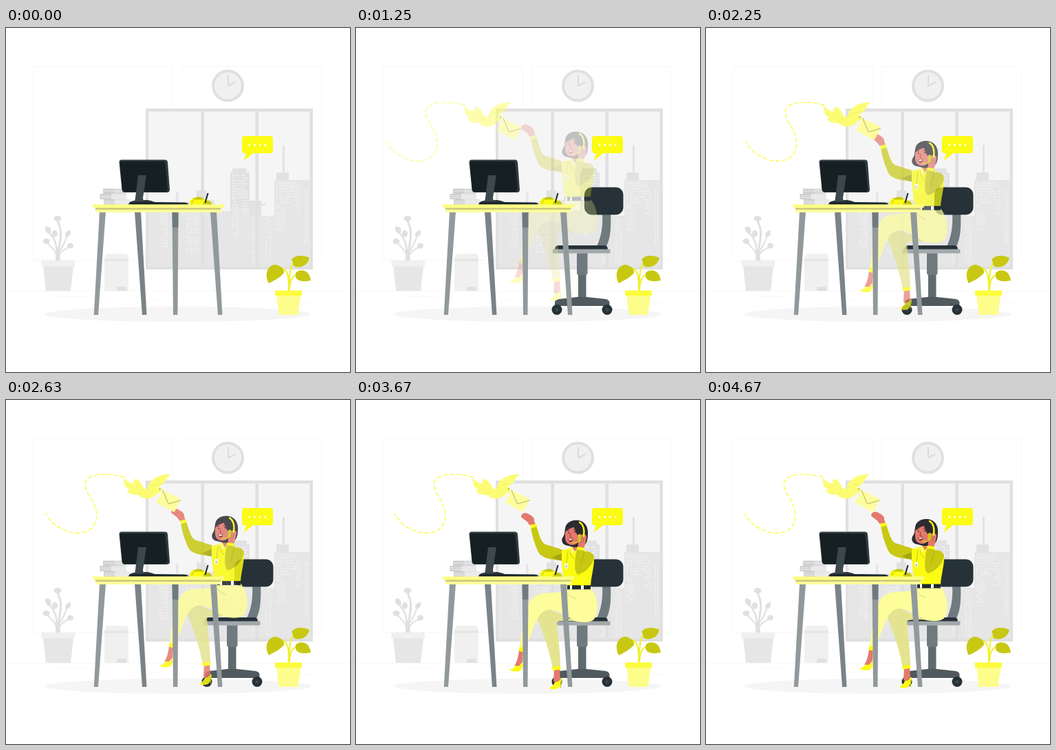
Recreate the animation shown at these times as an HTML page. Size 500 by 500 pixels, loop 4710 ms.

```html
<!DOCTYPE html>
<html lang="en">
<head>
<meta charset="utf-8">
<title>Office call</title>
<style>
html, body { margin: 0; width: 100%; height: 100%; overflow: hidden; background: #fff; }
svg { display: block; width: 100vw; height: 100vh; }
.y { fill: #fbfb13; }
.pale { fill: #fdfd9b; }
.olive { fill: #c8c813; }
.dark { fill: #263238; }
.skin { fill: #e4796c; }
.line { fill: none; stroke-linecap: round; stroke-linejoin: round; }
</style>
</head>
<body>
<svg viewBox="0 0 500 500" xmlns="http://www.w3.org/2000/svg">
  <g id="room">
    <g fill="#fff" stroke="#f7f7f7">
      <rect x="39" y="55.5" width="203.500" height="282" rx="2"/>
      <rect x="255" y="55.500" width="203.500" height="282" rx="2"/>
    </g>
    <path d="M0 382.500H500M405 398.500H449M75 390.500H118M193 395.500H225" stroke="#f3f3f3" stroke-width=".6"/>

    <rect x="203" y="117" width="243" height="234" fill="#e0e0e0"/>
    <rect x="207" y="121.500" width="234.500" height="225.500" fill="#f5f5f5"/>
    <path fill="#e6e6e6" d="M207 347V262H222V258H247V238H250.500V258H262V252H277V236H283.500V218H285V236H291V250H303V266H326V210H329V204H350V210H354V251H371V255H378V258H371V273H390V221H393V210H402V170H405V210H411V221H441.500V347Z"/>
    <path fill="#e0e0e0" d="M326 210H329V204H350V210H354V262H326ZM393 210H402.500V170H404.500V210H411V221H393ZM277 236H291V246H277ZM354 251H371V273H354Z" opacity=".65"/>
    <g id="lights" fill="#efefef"></g>
    <path fill="#e0e0e0" d="M283.500 120H288V349H283.500ZM362.500 120H367V349H362.500Z"/>

    <circle cx="322.500" cy="84" r="21.500" fill="#f0f0f0" stroke="#e0e0e0" stroke-width="4"/>
    <path class="line" d="M323 69V84L333 79" stroke="#dcdcdc" stroke-width="2"/>

    <ellipse cx="249.500" cy="416" rx="194" ry="11" fill="#f5f5f5"/>

    <g class="line" stroke="#e0e0e0" stroke-width="3">
      <path d="M75 338C76 316 82 304 79 292 78 286 75 284 75 277" />
      <path d="M75 338C74 315 72 308 64 299" stroke-width="2.500"/>
      <path d="M74 332C71 320 64 318 59 311M77 331C80 322 88 322 93 317M77 325C84 316 87 309 89 300" stroke-width="2"/>
    </g>
    <g fill="#e0e0e0">
      <ellipse cx="75" cy="277" rx="5.500" ry="4"/>
      <ellipse cx="71" cy="299" rx="4" ry="5"/>
      <ellipse cx="58.500" cy="310" rx="5" ry="4"/>
      <ellipse cx="93.500" cy="316.500" rx="4.500" ry="4"/>
      <path d="M57 289C64 287 68 293 64 300 58 298 56 293 57 289ZM94 294C95 300 92 304 87 304 84 298 89 294 94 294Z"/>
      <path d="M72 322H78L79 338H72Z"/>
    </g>
    <path fill="#e6e6e6" d="M54 346H98L94 382H58Z"/>
    <rect x="51.500" y="338" width="48.500" height="8.500" rx="1" fill="#f0f0f0"/>

    <path fill="#f0f0f0" d="M143 338H178V382H143ZM144 335C144 330 146 328 149 328H173C176 328 178 330 178 335Z"/>
    <rect x="143" y="335" width="35" height="4" fill="#e6e6e6"/>
    <path fill="#e0e0e0" d="M161 382V378Q161 376 163 376H172Q175 376 175 379V382Z"/>
  </g>

  <g id="chair">
    <path fill="#6f7a7e" d="M358 268H370C371 289 370 306 364 317H350C357 303 359 287 358 268Z"/>
    <rect class="dark" x="332" y="231.500" width="56.500" height="40" rx="11"/>
    <path class="line" d="M340 236Q335 238 335 246V258Q336 267 342 268" stroke="#37474f"/>
    <path class="dark" d="M289 322Q289 316 294 316H361Q366 316 366 322Z"/>
    <rect x="286" y="321.500" width="83.500" height="6" rx="1" fill="#a2a9ac"/>
    <path fill="#5f6a6e" d="M323 355H334.500V396H323Z"/>
    <path fill="#6f7a7e" d="M321 327.500H336.500V357Q336 359 333 359H324Q321 359 321 356Z"/>
    <path fill="#50595d" d="M289 404V398Q290 395 295 394L322 391H335L363 394Q368 395 368.500 399V404Z"/>
    <circle class="dark" cx="292" cy="409.500" r="7.500"/>
    <circle class="dark" cx="365" cy="409.500" r="7.500"/>
    <circle cx="292" cy="409.500" r="2.500" fill="#37474f"/>
    <circle cx="365" cy="409.500" r="2.500" fill="#37474f"/>
  </g>

  <g id="woman">
    <!-- far leg -->
    <path class="skin" d="M288 389H296L297 404 292 410 287 407Z"/>
    <path class="y" d="M298 402C300 407 298 413 294 417 290 419 284 419 281 417 285 414 288 412 289 408 293 409 296 406 298 402Z"/>
    <path d="M297.500 407V417" stroke="#c8c813"/>
    <path fill="#e4e490" d="M264 317C265 307 271 301 280 302L318 319C304 320 293 318 292 322 294 347 297 366 297 387L286 389C281 362 273 339 264 317Z"/>
    <path class="y" d="M285 386L297 385 297.500 390 286 391.500Z"/>
    <!-- near leg -->
    <path class="skin" d="M237 362L243 364 242 379 237 385 230 385C234 379 236 371 237 362Z"/>
    <path class="y" d="M242.500 378C243 384 242 390 238 392 234 394 226 393 223 390 228 389 231 387 232 384 237 387 240 383 242.500 378Z"/>
    <path class="pale" d="M303 271H341C352 284 354 310 345 318 338 323 323 321 316 319 304 310 294 304 280 303 270 304 264 313 259 327 254 340 249 352 244 364L237 361C240 344 242 321 250 297 254 285 262 280 276 279 287 278 296 278 303 276Z"/>
    <path class="line" d="M306 278Q310 284 319 287" stroke="#d3d386"/>
    <path class="y" d="M237.500 357L244.500 359 243 365 236.500 363Z"/>
    <!-- raised arm -->
    <path class="skin" d="M252 180C249 173 243 172 240 168 240 164 244 161 249 163 255 166 260 169 259 174L261 179Z"/>
    <path class="olive" d="M254 183L262 181C266 192 268 204 275 208 284 211 293 213 302 217L300 232C285 230 272 229 266 221 260 210 256 195 254 183Z"/>
    <path fill="#a5a510" d="M285 227Q294 223 300 221V232Q292 231 285 227Z"/>
    <path class="y" d="M253 180L261.500 178 263 182 254.500 185Z"/>
    <!-- torso -->
    <path class="y" d="M299 217L315 212 335 218C344 221 347 225 346 232 345 247 341 258 341 271H303C302 254 298 237 299 217Z"/>
    <path class="skin" d="M315 203H324L323 212 318 219 314 212Z"/>
    <path fill="#fdfd63" d="M314 211L318 219 312 223 309 214ZM323 211L318 219 324 223 328 215Z"/>
    <path class="line" d="M311 217Q312 226 317 229M308 218L306 236" stroke="#b9b910" stroke-width=".8"/>
    <rect x="303.500" y="235.500" width="4.500" height="7.500" rx="1" fill="#fff"/>
    <path d="M304.500 239H307M304.500 241H307" stroke="#777" stroke-width=".8"/>
    <rect x="303" y="267.500" width="38" height="6" fill="#20292d"/>
    <path fill="#fff" d="M304 267.500H307V273.500H304ZM311 267.500H314V273.500H311ZM327 267.500H331V273.500H327Z"/>
    <!-- head -->
    <path fill="#2b2b31" d="M304 185C305 176 314 172 322 173 333 174 338 183 337 194 337 205 333 210 327 212H316L304 209C299 207 298 201 301 197 304 193 303 189 304 185Z"/>
    <path class="skin" d="M304 190C306 184 312 181 318 181 321 186 325 191 327 195 327 202 322 208 315 209 308 209 304 205 304 198Z"/>
    <path fill="#2b2b31" d="M303 191Q306 183 314 181L322 180Q326 187 328 196L324 197Q318 190 317 183 310 184 303 191Z"/>
    <circle cx="309" cy="191" r=".9" fill="#222"/>
    <circle cx="318" cy="190" r=".9" fill="#222"/>
    <path class="line" d="M307 188.500L310 187.500M316 187L319.500 187M312 192L311 197 313 197.500" stroke="#6f302d" stroke-width=".8"/>
    <path fill="#7b2626" d="M308 200Q312 201 315 198.500 316 204 312 204.500 309 204 308 200Z"/>
    <path fill="#fff" d="M309 200.500Q312 201 314.500 199.500L314 201.500Q312 202.500 309.500 202Z"/>
    <!-- hand, sleeve and headset -->
    <path class="skin" d="M323 214C322 206 324 198 327 195 330 192 336 194 335 198 334 204 333 208 331 215Z"/>
    <path class="line" d="M325 176Q333 181 331 196" stroke="#fbfb13" stroke-width="2.400"/>
    <rect class="olive" x="322.500" y="193" width="5" height="11" rx="2.500"/>
    <path class="line" d="M325 203Q320 207 314 205" stroke="#d8d814" stroke-width="1.300"/>
    <path class="line" d="M328 199L327 205M331 199L330 205" stroke="#b9564e" stroke-width=".7"/>
    <path class="olive" d="M321 213L331 215 332 219C340 217 346 222 346 227 344 239 333 249 323 252 317 249 317 237 321 213Z"/>
    <path class="line" d="M332 219Q329 230 327 238" stroke="#a9a910" stroke-width=".9"/>
    <path class="y" d="M321.500 211.500L332 213 331.500 217 321 215.500Z"/>
  </g>

  <g id="desk">
    <g>
      <path fill="#e6e6e6" d="M138 241H175V249H138ZM142 249H180V257H142Z"/>
      <path fill="#cfcfcf" d="M141 233.500H157V241H141ZM136.500 241H153V249H136.500ZM142 249H158V257H142Z"/>
      <path fill="#dadada" d="M157 233.500H174V241H157Z"/>
      <path d="M138 244H174M138 246.500H174M143 252H179M143 254.500H179M142 237H172" stroke="#f2f2f2" stroke-width=".8"/>
    </g>
    <path fill="#2f3b40" d="M168 191.500H231Q234.500 191.500 235 195L238 235Q238 239 234 239H173Q169 239 168.500 235L164.500 195Q164.500 191.500 168 191.500Z"/>
    <path fill="#161f22" d="M168 194H228Q231 194 231.500 197L235 234Q235 238 231 238H173Q170 238 169 235L165.500 196Q165.500 194 168 194Z"/>
    <path class="dark" d="M178 256Q179 252 186 251L205 250Q212 251 216 253L260 253.500Q265 254 265.500 256.500H178Z"/>
    <path fill="#3c484c" d="M192 214H204L199 247 200 252H187L188 247Z"/>
    <path fill="#161f22" d="M180 254H214L262 255.500V256.500H180Z"/>

    <path class="y" d="M267 257Q267 249 272 247L285 247 291 250Q299 251 299.500 257Z"/>
    <path class="olive" d="M271 249Q277 244 284 246L288 249Q281 250 271 249ZM286 257Q287 250 294 251 299 252 299.500 257Z"/>
    <path d="M269 254H273M270 251.500H274" stroke="#99990f" stroke-width="1.200" stroke-dasharray="1 1"/>
    <path d="M289.500 254L293.500 240" stroke="#263238" stroke-width="2.200"/>

    <path fill="#92999c" d="M136 267H145L134 417H127.800ZM297 267H306L314.500 417H308ZM241.500 267H250.500L249.500 417H243Z"/>
    <path fill="#7a8387" d="M187 267H196L204.500 417H198Z"/>
    <path fill="#6f7a7e" d="M241.500 267H250.500L250.300 290H242Z"/>
    <path class="pale" d="M130 263H313V268H132Q130 268 130 266Z"/>
    <path fill="#c8c87a" d="M130 261H312V264H130Z"/>
    <path fill="#fdfd84" d="M125 256.500H318L316 261.500H128Q126 260 125 256.500Z"/>
  </g>

  <g id="plant">
    <path class="line" d="M411 382C411 364 411 352 401 349M411 382C412 362 412 347 419 340M412 380C413 368 415 360 424 358" stroke="#f0f02a" stroke-width="2"/>
    <path class="olive" d="M382 371C375 359 380 345 391 344 399 345 405 350 404 356 398 363 390 367 382 371ZM415 337C419 330 431 329 441 334 439 344 430 349 420 347 416 345 418 340 415 337ZM421 356C426 350 441 350 443 367 434 369 424 369 421 362Z"/>
    <path fill="#fdfd8c" d="M393 387H428.500L424.500 417H396.500Z"/>
    <rect x="391" y="381.500" width="39" height="7.500" rx="1" fill="#fcfc3c"/>
  </g>

  <g id="bird">
    <path class="line" d="M170 112C145 105 108 106 114 127 118 142 131 150 130 170 128 193 105 197 88 191 71 185 63 177 56 165" stroke="#fbfb3a" stroke-width="1.300" stroke-dasharray="5.500 4"/>
    <path fill="#fcfc74" d="M169 113C175 119 181 122 185 121 183 118 184 116 186 115 191 115 195 120 199 129L204 129C206 118 216 108 237 108 235 111 234 112 231 113 234 114 233 116 229 117 231 119 229 121 225 122 224 125 221 126 219 127 224 127 227 130 224 133 218 135 215 141 207 143 199 145 193 140 189 137 183 139 177 137 174 131 177 131 178 130 177 129 172 128 170 124 171 121 170 119 169 116 169 113Z"/>
    <path class="line" d="M204 130Q211 121 225 122M189 137Q196 135 199 129" stroke="#f0f04e" stroke-width=".8"/>
    <path class="pale" d="M226 131L253 144 243 163 216.500 149Z" fill-opacity=".96"/>
    <path class="line" d="M226 131L234 150Q235 152 238 150L252 146" stroke="#9b9b62" stroke-width=".8"/>
    <circle cx="222" cy="129.500" r=".8" fill="#555"/>
  </g>

  <g id="bubble">
    <path class="y" d="M347 157H384Q388 157 388 161V178Q388 182 384 182H359L346 192.500 349 182H347Q343 182 343 178V161Q343 157 347 157Z"/>
    <g fill="#fff">
      <circle cx="354" cy="170" r="1.600"/><circle cx="361.700" cy="170" r="1.600"/>
      <circle cx="369.300" cy="170" r="1.600"/><circle cx="377" cy="170" r="1.600"/>
    </g>
  </g>
</svg>
<script>
const LOOP = 4710;
const $ = id => document.getElementById(id);

// Lit windows: left, top, columns, rows
const blocks = [
  [223, 268, 4, 13], [262, 272, 6, 14], [329, 213, 7, 9], [329, 248, 3, 14],
  [344, 250, 3, 5], [357, 276, 2, 17], [377, 276, 3, 17], [393, 224, 4, 18],
  [405, 224, 5, 8], [419, 228, 3, 11], [434, 236, 2, 20]
];
let seed = 7;
const rand = () => (seed = seed * 16807 % 2147483647) / 2147483647;
let cells = '';
for (const [x, y, cols, rows] of blocks)
  for (let r = 0; r < rows; r++)
    for (let c = 0; c < cols; c++)
      if (rand() < 0.8) cells += `M${x + c * 3.3} ${y + r * 4}h2v2.400h-2z`;
$('lights').innerHTML = `<path d="${cells}"/>`;

// Cubic Bézier easing, solved by bisection
const cubic = (a, b, s) => 3 * (1 - s) * (1 - s) * s * a + 3 * (1 - s) * s * s * b + s ** 3;
function ease(x) {
  if (x >= 1) return 1;
  let lo = 0, hi = 1;
  for (let i = 0; i < 24; i++) {
    const mid = (lo + hi) / 2;
    if (cubic(0.36, 0.5, mid) < x) lo = mid; else hi = mid;
  }
  return cubic(-0.01, 1.38, lo);
}

const entries = [
  { el: $('chair'), time: 970, dx: 0, dy: -30 },
  { el: $('bird'), time: 2920, dx: -30, dy: 0 },
  { el: $('woman'), time: 4680, dx: 0, dy: -30 }
];

function draw(t) {
  for (const { el, time, dx, dy } of entries) {
    const p = ease(t / time), rest = 1 - p;
    el.setAttribute('transform', `translate(${dx * rest} ${dy * rest})`);
    el.setAttribute('opacity', Math.min(1, Math.max(0, p)));
  }
}

const start = performance.now();
function tick() {
  draw((performance.now() - start) % LOOP);
  requestAnimationFrame(tick);
}
draw(0);
requestAnimationFrame(tick);
</script>
</body>
</html>
```
